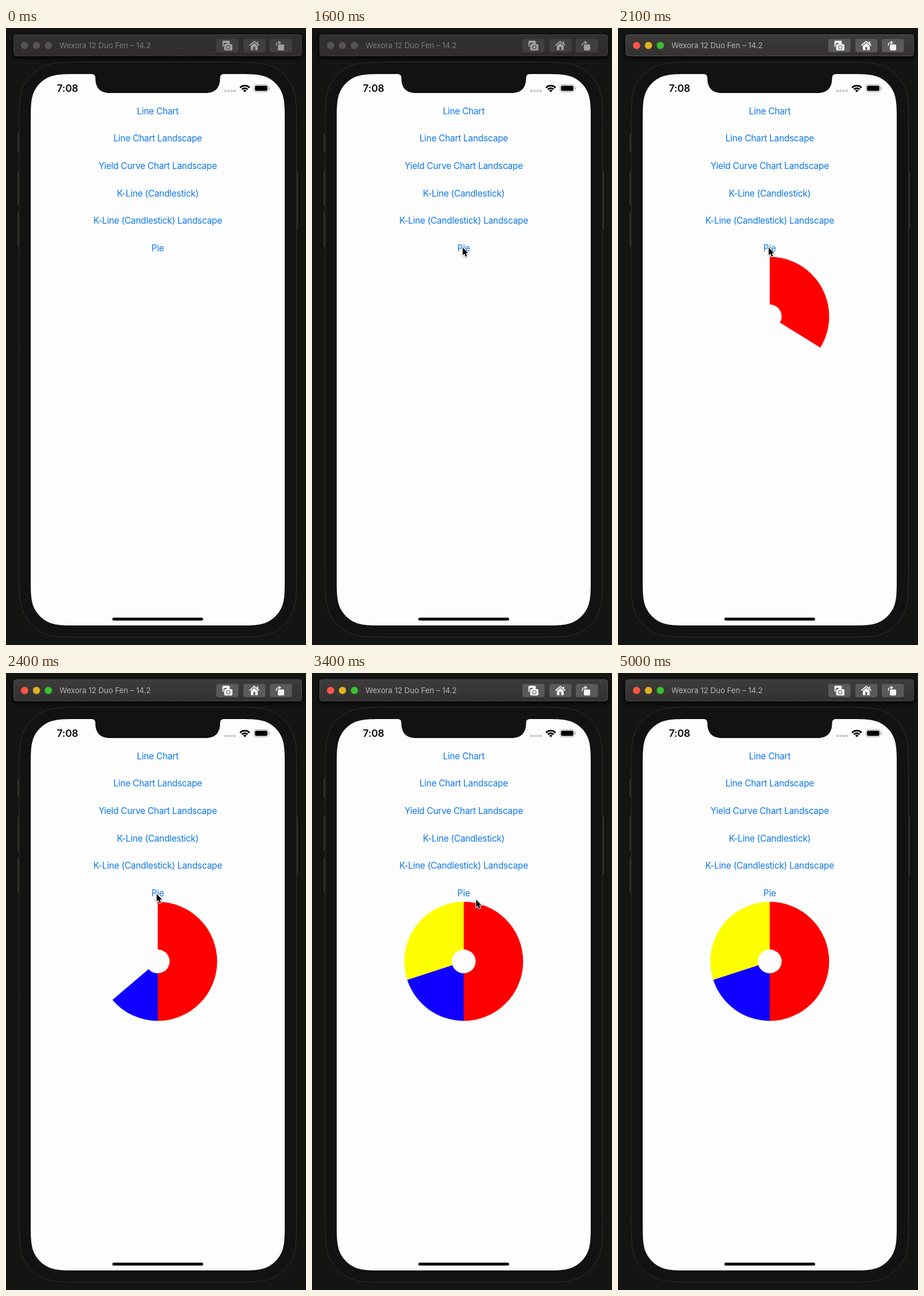
Recreate the animation shown at these times as an HTML page with a canvas. Size 522 by 1072 pixels, loop 5.1 s.

```html
<!DOCTYPE html>
<html lang="en">
<head>
<meta charset="utf-8">
<title>Pie chart demo</title>
<style>
  html, body { margin: 0; width: 100%; height: 100%; overflow: hidden; background: #141413; }
  canvas { display: block; width: 522px; height: 1072px; }
</style>
</head>
<body>
<canvas id="stage" width="522" height="1072"></canvas>
<script>
const ctx = document.getElementById('stage').getContext('2d');
const LOOP = 5100, STEP = 100;
const FOCUS_AT = 1700, PIE_AT = 1762, PIE_TIME = 1000;
const SCREEN = '#fdfdfd', BEZEL = '#121212';
const MENU = ['Line Chart', 'Line Chart Landscape', 'Yield Curve Chart Landscape',
  'K-Line (Candlestick)', 'K-Line (Candlestick) Landscape', 'Pie'];
const SLICES = [[0, 0.5, '#ff0000'], [0.5, 0.7, '#1000ff'], [0.7, 1, '#fdff00']];
// time, x, y of the pointer tip
const POINTER = [[100, 526, 618], [500, 390, 527], [1200, 262, 381],
  [2200, 262, 381], [2600, 262, 386], [3300, 262, 386], [3850, 530, 470]];

function box(x, y, w, h, r, fill, stroke) {
  ctx.beginPath();
  ctx.roundRect(x, y, w, h, r);
  paint(fill, stroke);
}

function paint(fill, stroke) {
  if (fill) { ctx.fillStyle = fill; ctx.fill(); }
  if (stroke) { ctx.strokeStyle = stroke; ctx.lineWidth = 1; ctx.stroke(); }
}

function disc(x, y, r, fill) {
  ctx.beginPath();
  ctx.arc(x, y, r, 0, 7);
  paint(fill);
}

function poly(points, fill) {
  ctx.beginPath();
  points.forEach(p => ctx.lineTo(p[0], p[1]));
  ctx.closePath();
  paint(fill);
}

function label(text, x, y, font, color, spacing = 0, align = 'left') {
  ctx.font = font + ' Inter, Roboto, sans-serif';
  ctx.letterSpacing = spacing + 'px';
  ctx.textAlign = align;
  ctx.fillStyle = color;
  ctx.fillText(text, x, y);
}

// Rectangle with continuous-curvature corners
function smoothBox(x, y, w, h, r, fill, stroke) {
  const a = 1.5287 * r, b = 1.0885 * r, c = 0.8684 * r, d = 0.6315 * r,
        e = 0.0749 * r, f = 0.3728 * r, g = 0.1691 * r;
  const corners = [[x, y, 1, 0], [x + w, y, 0, 1], [x + w, y + h, -1, 0], [x, y + h, 0, -1]];
  ctx.beginPath();
  for (const [cx, cy, ux, uy] of corners) {
    // u runs along the outgoing edge, v along the incoming one
    const p = (u, v) => [cx + u * ux - v * uy, cy + u * uy + v * ux];
    ctx.lineTo(...p(0, a));
    ctx.bezierCurveTo(...p(0, b), ...p(0, c), ...p(e, d));
    ctx.bezierCurveTo(...p(g, f), ...p(f, g), ...p(d, e));
    ctx.bezierCurveTo(...p(c, 0), ...p(b, 0), ...p(a, 0));
  }
  ctx.closePath();
  paint(fill, stroke);
}

function cameraIcon(ink, gap) {
  box(376.5, 22, 13, 11, 2, ink);
  box(378.5, 26, 16, 14, 2.5, gap);
  box(379.5, 28, 14.5, 11, 2, ink);
  box(383.5, 26, 6, 4, 1.5, ink);
  disc(386.7, 33.5, 3.6, gap);
  disc(386.7, 33.5, 2.5, ink);
}

function homeIcon(ink, gap) {
  ctx.beginPath();
  ctx.moveTo(423.5, 30.5);
  ctx.lineTo(432, 23.2);
  ctx.lineTo(440.5, 30.5);
  ctx.strokeStyle = ink;
  ctx.lineWidth = 1.8;
  ctx.stroke();
  box(436.5, 23.5, 2.2, 5, 0, ink);
  poly([[426, 31], [432, 26], [438, 31], [438, 38.5], [426, 38.5]], ink);
  box(430.5, 33, 3, 5.5, 0, gap);
}

function rotateIcon(ink) {
  box(473, 28.5, 11, 10.5, 2, ink);
  ctx.beginPath();
  ctx.moveTo(470.2, 31);
  ctx.quadraticCurveTo(470, 25.3, 475, 25.3);
  ctx.strokeStyle = ink;
  ctx.lineWidth = 1.6;
  ctx.stroke();
  poly([[474.5, 22], [479, 25.3], [474.5, 28.5]], ink);
}

function titleBar(active) {
  const fade = ctx.createLinearGradient(0, 11, 0, 49);
  fade.addColorStop(0, active ? '#3d3c3a' : '#333031');
  fade.addColorStop(1, active ? '#333230' : '#2e2c2c');
  ctx.save();
  ctx.shadowColor = '#000';
  ctx.shadowBlur = 10;
  ctx.shadowOffsetY = 3;
  box(13, 11, 502, 38, 5, fade);
  ctx.restore();
  box(13.5, 11.5, 501, 37, 5, null, active ? '#504f4d' : '#3d3a3b');

  const lights = active ? ['#ff5547', '#dfb021', '#38c02f'] : Array(3).fill('#575253');
  lights.forEach((color, i) => disc(32.3 + 20.7 * i, 30.3, 6.3, color));
  label('Wexora 12 Duo Fen – 14.2', 93, 35, '13.3px', active ? '#b6b5b3' : '#7f7c7c', -0.05);

  const ink = active ? '#f3f3f2' : '#a09d9e';
  const key = active ? '#5b5a58' : '#423f41';
  [366, 413, 459].forEach(x => box(x, 19, 38.5, 23, 4, key));
  cameraIcon(ink, key);
  homeIcon(ink, key);
  rotateIcon(ink);
}

function phone() {
  [[18.5, 183, 34], [18.5, 248, 62], [18.5, 319.5, 62], [503.5, 248, 103]]
    .forEach(([x, y, h]) => box(x, y, 6, h, 1.5, '#282825', '#050505'));
  smoothBox(23, 59.5, 482.5, 999, 74, BEZEL, '#303030');
  smoothBox(43, 80, 442, 958, 55, SCREEN);

  // notch
  ctx.beginPath();
  ctx.moveTo(149, 79);
  ctx.lineTo(149, 80);
  ctx.quadraticCurveTo(155.5, 80, 155.5, 87);
  ctx.bezierCurveTo(155.5, 104, 164, 113, 181, 113);
  ctx.lineTo(347, 113);
  ctx.bezierCurveTo(364, 113, 372.5, 104, 372.5, 87);
  ctx.quadraticCurveTo(372.5, 80, 379, 80);
  ctx.lineTo(379, 79);
  paint(BEZEL);
  box(185, 1024.5, 158, 5, 2.5, '#000');
}

function statusBar() {
  label('7:08', 88.5, 111.3, '600 17.5px', '#0a0a0a', -0.2);
  for (let i = 0; i < 4; i++) box(379.7 + 5.4 * i, 107.3, 4.2, 4, 1.5, '#c5c5c9');

  const wedge = (r0, r1) => {
    const a = -Math.PI * 0.76, b = -Math.PI * 0.24;
    ctx.beginPath();
    ctx.arc(415.5, 111.5, r1, a, b);
    if (r0) ctx.arc(415.5, 111.5, r0, b, a, true);
    else ctx.lineTo(415.5, 111.5);
    paint('#000');
  };
  wedge(0, 4);
  wedge(5.6, 8.3);
  wedge(9.9, 12.7);

  box(431.5, 98.5, 25, 12.5, 3.8, null, '#a2a2a4');
  box(433.2, 100.2, 21.6, 9.1, 2.4, '#000');
  box(457.7, 102.7, 1.5, 4, 1, '#a2a2a4');
}

function pie(done) {
  const top = -Math.PI / 2, turn = Math.PI * 2;
  for (const [from, to, color] of SLICES) {
    const end = Math.min(to, done);
    if (end <= from) continue;
    ctx.beginPath();
    ctx.arc(264, 501, 103.4, top + from * turn, top + end * turn);
    ctx.arc(264, 501, 20.7, top + end * turn, top + from * turn, true);
    ctx.closePath();
    paint(color);
  }
}

function pointer(t) {
  const i = POINTER.findIndex(k => k[0] > t);
  if (i < 1) return;
  const [t0, x0, y0] = POINTER[i - 1], [t1, x1, y1] = POINTER[i];
  const u = (t - t0) / (t1 - t0), s = u * u * (3 - 2 * u);
  ctx.save();
  ctx.translate(x0 + (x1 - x0) * s, y0 + (y1 - y0) * s);
  ctx.shadowColor = 'rgba(0,0,0,0.35)';
  ctx.shadowBlur = 3;
  ctx.shadowOffsetY = 1;
  const arrow = [[0.3, 0.5], [0.3, 13.6], [3.2, 11], [5.4, 16.2], [7.6, 15.2], [5.5, 10.2], [9.3, 10]];
  poly(arrow, '#fff');
  ctx.strokeStyle = '#fff';
  ctx.lineWidth = 2;
  ctx.stroke();
  ctx.shadowColor = 'transparent';
  poly(arrow, '#000');
  ctx.restore();
}

function draw(t) {
  ctx.fillStyle = '#141413';
  ctx.fillRect(0, 0, 522, 1072);
  titleBar(t >= FOCUS_AT);
  phone();
  statusBar();
  MENU.forEach((text, i) => label(text, 264, 149.8 + 47.6 * i, '15.4px', '#0d78e9', -0.25, 'center'));
  pie(Math.max(0, Math.min(1, (t - PIE_AT) / PIE_TIME)));
  pointer(t);
}

const start = performance.now();
function tick() {
  const t = (performance.now() - start) % LOOP;
  draw(Math.floor(t / STEP) * STEP);
  requestAnimationFrame(tick);
}
tick();
</script>
</body>
</html>
```
